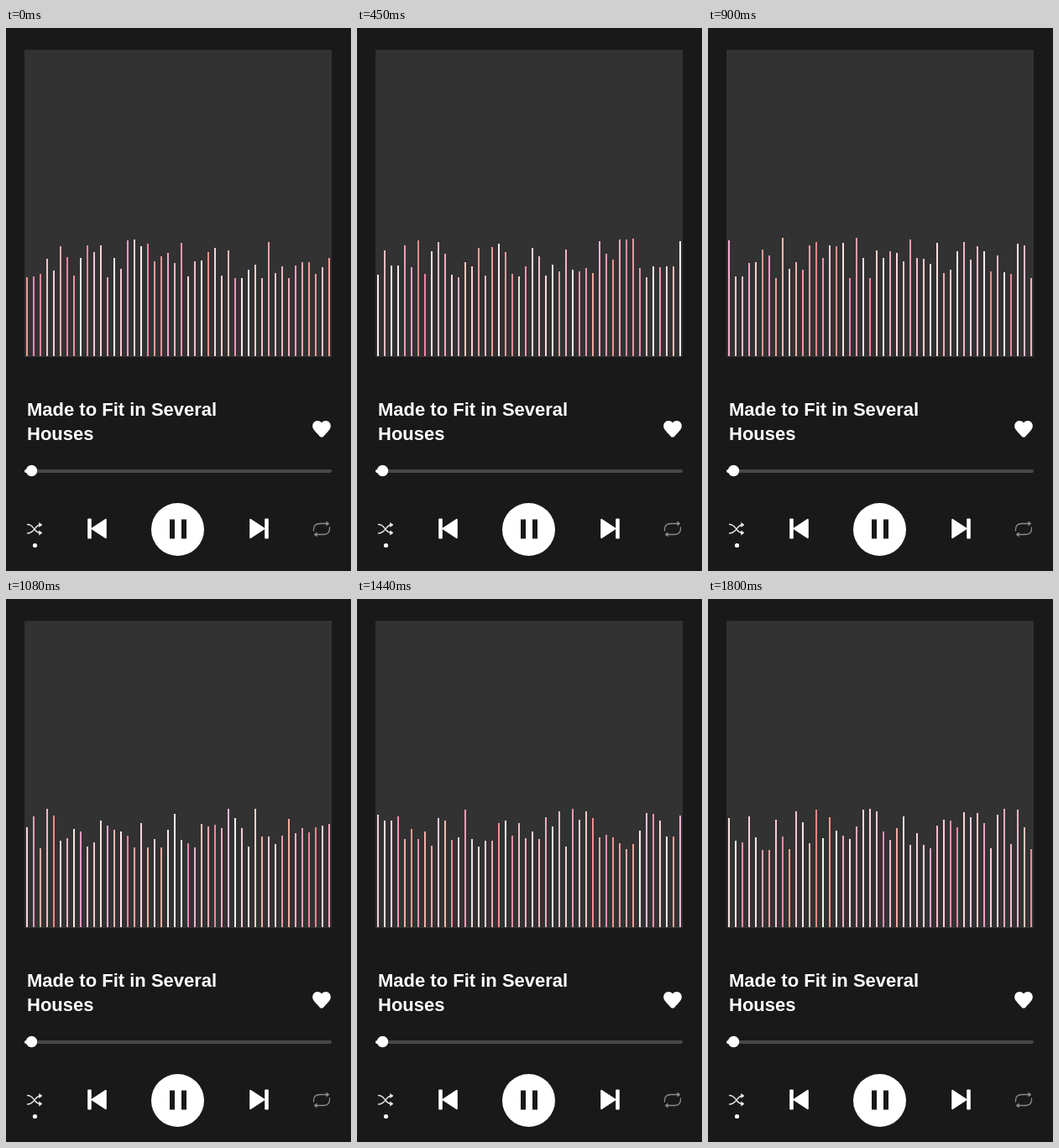
Write an HTML page that moves like this. It is 411x647 px and loops after 1890 ms.

```html
<!DOCTYPE html>
<html lang="en">
<head>
<meta charset="utf-8">
<title>Music player</title>
<style>
  html, body { margin: 0; width: 100%; height: 100%; overflow: hidden; background: #191919; }
  svg { display: block; }
  .title { font: bold 22px "Liberation Sans", Arial, sans-serif; fill: #fff; }
  .line { fill: none; stroke-width: 1.3; stroke-linecap: round; stroke-linejoin: round; }
</style>
</head>
<body>
<svg width="411" height="647" viewBox="0 0 411 647">
  <rect width="411" height="647" fill="#191919"/>
  <rect x="22" y="26" width="366" height="366" fill="#323232"/>
  <g id="bars"></g>

  <text class="title" x="25" y="462">Made to Fit in Several</text>
  <text class="title" x="25" y="491">Houses</text>
  <path fill="#fff" d="M376 470.4C373.6 467.6 369.6 467.4 367.2 469.6C364.6 472 364.6 476 366.8 478.8C368.6 481.2 371 483.6 373.6 486.4Q376 488.8 378.4 486.4C381 483.6 383.4 481.2 385.2 478.8C387.4 476 387.4 472 384.8 469.6C382.4 467.4 378.4 467.6 376 470.4Z"/>

  <rect x="22" y="526" width="366" height="4" rx="2" fill="#484848"/>
  <rect x="22" y="526" width="9" height="4" rx="2" fill="#fff"/>
  <circle cx="30.5" cy="527.5" r="6.7" fill="#fff"/>

  <g class="line" stroke="#e8e8e8">
    <path d="M25.5 591.5C31 591.5 32.5 596 34.5 598C36.5 600.5 38 601.5 41 601.5M25.5 602C30 602 32 599.5 34 597C36.5 593.5 38 592 41 592"/>
    <path fill="#e8e8e8" stroke-width=".8" d="M39.8 589.8L43 592L39.8 594.2ZM39.8 599.3L43 601.5L39.8 603.7Z"/>
  </g>
  <circle cx="34.5" cy="616.5" r="2.6" fill="#fff"/>

  <g id="skip" fill="#fff" stroke="#fff" stroke-linejoin="round">
    <rect x="97.2" y="584.5" width="4.6" height="24" rx="1" stroke="none"/>
    <path stroke-width="2" d="M102.4 596.5L118.8 585.8V607.2Z"/>
  </g>
  <use href="#skip" transform="translate(410 0) scale(-1 1)"/>

  <circle cx="204.5" cy="597.5" r="31.5" fill="#fff"/>
  <path fill="#191919" d="M195 585.5h6v23h-6zM209 585.5h6v23h-6z"/>

  <g class="line" stroke="#8c8c8c">
    <path d="M366.5 599V597.5C366.5 593 369.5 590.5 374 590.5H383M385.5 595V596.5C385.5 601 382.5 603.5 378 603.5H369"/>
    <path fill="#8c8c8c" stroke-width=".7" d="M382 588.3L385 590.5L382 592.7ZM370 601.3L367 603.5L370 605.7Z"/>
  </g>
</svg>
<script>
  const LOOP = 1890, STEP = 90, COUNT = 46, FLOOR = 391;

  const holder = document.getElementById("bars");
  const bars = Array.from({ length: COUNT }, (_, i) => {
    const bar = document.createElementNS(holder.namespaceURI, "rect");
    bar.setAttribute("x", 24 + 8 * i);
    bar.setAttribute("width", 2);
    return holder.appendChild(bar);
  });

  function seeded(seed) {
    let state = seed;
    return () => {
      state = (state + 0x6D2B79F5) | 0;
      let mixed = Math.imul(state ^ (state >>> 15), 1 | state);
      mixed = (mixed + Math.imul(mixed ^ (mixed >>> 7), 61 | mixed)) ^ mixed;
      return ((mixed ^ (mixed >>> 14)) >>> 0) / 4294967296;
    };
  }

  function draw(step) {
    const random = seeded(step * 7919 + 17);
    for (const bar of bars) {
      const height = 92 + Math.floor(random() * 50);
      const hue = 328 + 44 * random();
      const lightness = 72 + 25 * random();
      bar.setAttribute("y", FLOOR - height);
      bar.setAttribute("height", height);
      bar.setAttribute("fill", `hsl(${hue % 360}, 75%, ${lightness}%)`);
    }
  }

  let shown;
  function tick() {
    // The first pose is held for two steps.
    const step = Math.max(1, Math.floor(performance.now() % LOOP / STEP));
    if (step !== shown) draw(shown = step);
    requestAnimationFrame(tick);
  }
  tick();
</script>
</body>
</html>
```
